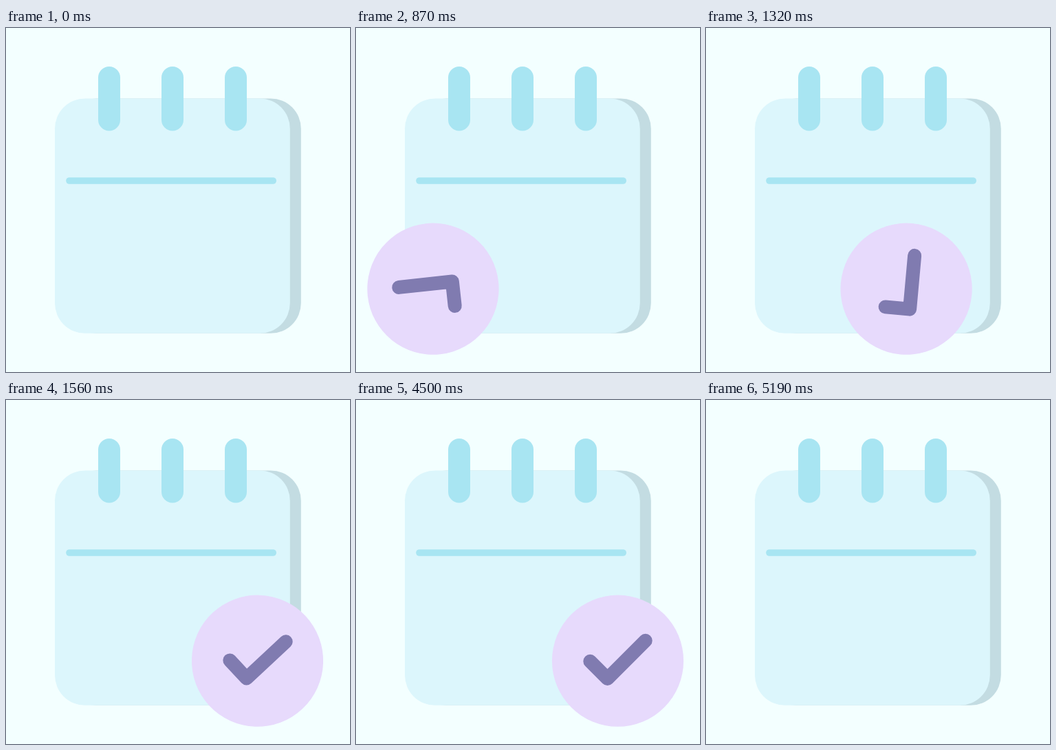
Recreate the animation shown at these times as an HTML page with a canvas. Size 500 by 500 pixels, loop 5.46 s.

```html
<!DOCTYPE html>
<html lang="en">
<head>
<meta charset="utf-8">
<title>Calendar check</title>
<style>
  html, body { margin: 0; width: 100%; height: 100%; overflow: hidden; background: #f3ffff; }
  canvas { display: block; width: 100vmin; height: 100vmin; }
</style>
</head>
<body>
<canvas id="stage" width="500" height="500"></canvas>
<script>
const ctx = document.getElementById('stage').getContext('2d');
const LOOP = 5460, STEP = 30, SETTLED = 2160, EXIT = 4500, GONE = 5190;
const BADGE_Y = 379.2, RADIUS = 95.6, REST_X = 392.5, EXIT_X = 380.5;

// [time, value] keys of the roll-in
const ROLL_X = [[0, -107.5], [210, -96], [630, 17.5], [780, 75.5], [1080, 198.5],
  [1350, 301.5], [1560, 365.5], [1860, 408], [2160, REST_X]];
const ROLL_ANGLE = [[0, -267], [210, -260], [630, -195], [780, -162], [1080, -92],
  [1350, -34], [1560, 2], [1800, 14], [2160, 0]];

function slope(keys, i) {
  if (i === 0 || i === keys.length - 1) return 0;
  const [a, b, c] = [keys[i - 1], keys[i], keys[i + 1]];
  const h0 = b[0] - a[0], h1 = c[0] - b[0];
  const d0 = (b[1] - a[1]) / h0, d1 = (c[1] - b[1]) / h1;
  return d0 * d1 <= 0 ? 0 : (h0 * d1 + h1 * d0) / (h0 + h1);
}

// Smooth cubic curve through the keys
function curve(keys, t) {
  let i = 0;
  while (i < keys.length - 2 && t > keys[i + 1][0]) i++;
  const [t0, v0] = keys[i], [t1, v1] = keys[i + 1];
  const h = t1 - t0, u = (t - t0) / h, w = 1 - u;
  return v0 * (1 + 2 * u) * w * w + slope(keys, i) * h * u * w * w
    + v1 * u * u * (3 - 2 * u) - slope(keys, i + 1) * h * u * u * w;
}

function badgePose(t) {
  if (t < SETTLED) return { x: curve(ROLL_X, t), angle: curve(ROLL_ANGLE, t) };
  if (t < EXIT) return { x: REST_X, angle: 0 };
  const s = t - EXIT, travel = 0.23 * s + 0.00014 * s * s;
  return { x: EXIT_X + travel, angle: travel / 1.767 };
}

function box(x, y, w, h, r, color) {
  ctx.fillStyle = color;
  ctx.beginPath();
  ctx.roundRect(x, y, w, h, r);
  ctx.fill();
}

function drawCalendar() {
  box(87, 102.4, 341.8, 341.4, 44, '#c3dce2');
  box(71, 102.4, 341.8, 341.4, 44, '#dcf6fc');
  box(87.2, 217.2, 305.8, 9.6, 4.8, '#a8e5f2');
  for (const x of [134, 226, 318]) box(x, 56, 32, 93.5, 16, '#a8e5f2');
}

function drawBadge({ x, angle }) {
  ctx.save();
  ctx.translate(x, BADGE_Y);
  ctx.rotate(angle * Math.PI / 180);
  ctx.fillStyle = '#e7dafc';
  ctx.beginPath();
  ctx.arc(0, 0, RADIUS, 0, 2 * Math.PI);
  ctx.fill();
  ctx.strokeStyle = '#807bb0';
  ctx.lineWidth = 20;
  ctx.lineCap = ctx.lineJoin = 'round';
  ctx.beginPath();
  ctx.moveTo(-40.2, 0.6);
  ctx.lineTo(-15, 25.8);
  ctx.lineTo(40.2, -29.4);
  ctx.stroke();
  ctx.restore();
}

function draw(now) {
  const t = Math.floor(now % LOOP / STEP) * STEP;
  ctx.fillStyle = '#f3ffff';
  ctx.fillRect(0, 0, 500, 500);
  drawCalendar();
  if (t < GONE) drawBadge(badgePose(t));
}

let start;
function tick(now) {
  start ??= now;
  draw(now - start);
  requestAnimationFrame(tick);
}
draw(0);
requestAnimationFrame(tick);
</script>
</body>
</html>
```
